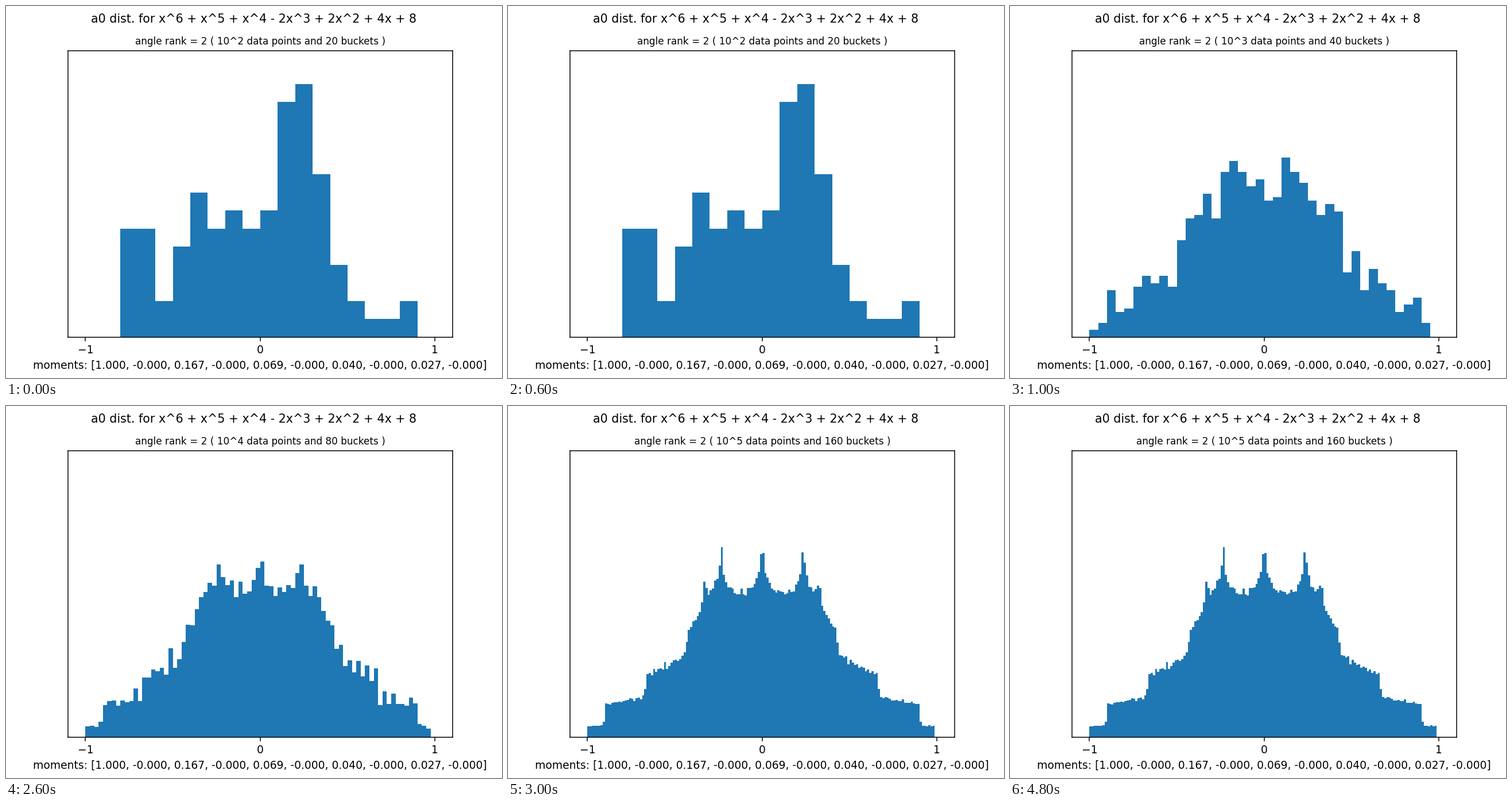
Recreate the animation shown at these times as a matplotlib script. Size 864x648 px, loop 6 s.

```python
import numpy as np
import matplotlib.pyplot as plt
from matplotlib.animation import FuncAnimation

WIDTH, HEIGHT, DPI = 864, 648, 135
STEP_MS = 1000
STEPS = 6          # the last histogram is held for three steps
LAST_STAGE = 3

plt.rcParams["font.family"] = "DejaVu Sans"

# Frobenius angles: x + 2/x turns the polynomial into (u + 2)(u^2 - u - 3)
TRACES = np.array([-2, (1 + np.sqrt(13)) / 2, (1 - np.sqrt(13)) / 2])
ANGLES = np.arccos(TRACES / np.sqrt(8))

MOMENTS = [1, -0.0, 0.167, -0.0, 0.069, -0.0, 0.040, -0.0, 0.027, -0.0]


def normalized_traces(count):
    powers = np.arange(1, count + 1)
    return np.cos(np.outer(powers, ANGLES)).mean(axis=1)


fig, ax = plt.subplots(figsize=(WIDTH / DPI, HEIGHT / DPI), dpi=DPI)
fig.suptitle("a0 dist. for x^6 + x^5 + x^4 - 2x^3 + 2x^2 + 4x + 8", fontsize=11)


def draw(step):
    stage = min(step, LAST_STAGE)
    exponent, buckets = stage + 2, 20 * 2**stage
    edges = -1 + 2 * np.arange(buckets) / buckets

    ax.clear()
    ax.hist(normalized_traces(10**exponent), bins=edges, density=True, color="#1f77b4")
    ax.set_xlim(-1.1, 1.1)
    ax.set_ylim(0, 1.6)
    ax.set_xticks([-1, 0, 1])
    ax.set_yticks([])
    ax.set_title(
        f"angle rank = 2 ( 10^{exponent} data points and {buckets} buckets )",
        fontsize=9,
    )
    ax.set_xlabel("moments: [" + ", ".join(f"{m:.3f}" for m in MOMENTS) + "]")
    return ax.patches


anim = FuncAnimation(fig, draw, frames=STEPS, interval=STEP_MS,
                     init_func=lambda: draw(0), repeat=True, repeat_delay=0)
plt.show()
```
